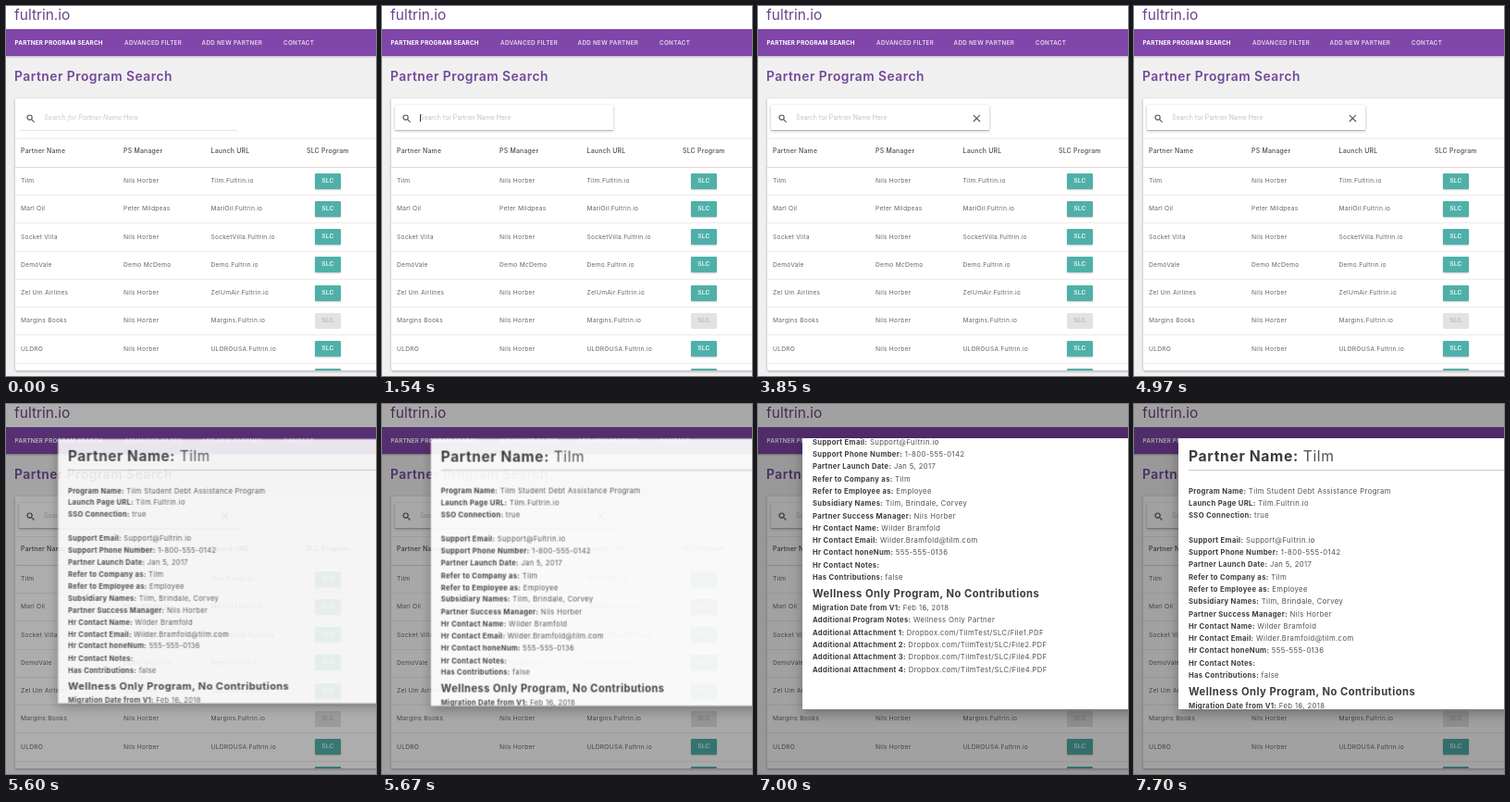
These frames come from a looping animation (400x400 px, 8000 ms). An HTML page:

```html
<!DOCTYPE html>
<html lang="en">
<head>
<meta charset="utf-8">
<title>Partner Program Search</title>
<style>
  html, body { margin: 0; width: 100%; height: 100%; overflow: hidden; }
  body { font: 6.7px/14px Inter, "Open Sans", sans-serif; letter-spacing: .035em; color: #666; }
  #stage { position: relative; width: 400px; height: 400px; overflow: hidden; background: #f0f0f0; }
  #stage div, #stage span.at, svg { position: absolute; white-space: nowrap; }

  .top { left: 0; top: 0; width: 400px; height: 25px; background: #fff; }
  .brand { left: 9px; top: 1px; font-size: 15.5px; line-height: 18px; letter-spacing: 0; color: #6a4387; }
  .nav { left: 0; top: 25px; width: 400px; height: 28.5px; background: #8046a9; color: #e6d9ee;
    font-size: 6.3px; font-weight: 600; letter-spacing: .05em; box-shadow: 0 1px 2px rgba(0,0,0,.25); }
  .nav .at { top: 7.5px; }
  .nav .on { color: #fff; font-weight: 700; letter-spacing: .03em; }
  h1 { position: absolute; margin: 0; left: 9px; top: 66px; font-size: 13.8px; line-height: 20px;
    font-weight: 600; letter-spacing: .036em; color: #74479a; white-space: nowrap; }

  .card { left: 9.5px; top: 99.5px; width: 420px; height: 294.5px; border-radius: 2px; background: #fff;
    box-shadow: 0 1px 3px rgba(0,0,0,.3); }
  .table { left: 0; top: 0; width: 400px; height: 394px; overflow: hidden; }
  .line { left: 10px; width: 390px; height: 1px; background: #ececec; }
  .head { color: #4d4d4d; font-size: 6.9px; font-weight: 500; }
  .row { left: 0; width: 400px; height: 30px; }
  .row .at { top: 8px; }
  .row .line { top: 30px; }
  .slc { left: 334px; top: 6.5px; width: 28px; height: 17px; line-height: 17px; border-radius: 1px;
    background: #4fb0aa; color: #e9f7f5; font-weight: 600; text-align: center;
    box-shadow: 0 1px 2px rgba(0,0,0,.2); }
  .slc.off { background: #e2e2e2; color: #b9b9b9; box-shadow: none; }

  .search { left: 14px; top: 107px; width: 236px; height: 28px; background: #fff;
    border-bottom: 1px solid #e6e6e6; box-sizing: border-box; }
  .lift { inset: 0; box-shadow: 0 1px 3px rgba(0,0,0,.32); }
  .search .at { top: 7px; left: 27px; }
  .hint { color: #c2c2c2; letter-spacing: 0; font-size: 6.9px; }
  .idle { font-style: italic; font-size: 7.1px; color: #c8c8c8; }
  .typed { font-size: 7px; letter-spacing: 0; color: #444; }
  .search .i { left: 29.8px; }
  .caret { left: 27px; top: 10px; width: .8px; height: 8px; background: #333; }
  .drop { left: 14px; top: 136.5px; width: 86.5px; height: 23.5px; background: #fff;
    box-shadow: 0 1px 2px rgba(0,0,0,.22); font-size: 6px; line-height: 23px; color: #444; text-indent: 6px; }

  .dim { inset: 0; background: rgba(0,0,0,.37); }
  .modal { left: 48px; top: 37px; width: 664px; height: 293px; overflow: hidden; background: #fff; color: #505050;
    transform-origin: 50% 50%; box-shadow: 0 5px 12px rgba(0,0,0,.3); }
  .body { left: 11px; top: 1px; width: 640px; height: 420px; font-size: 7.7px; letter-spacing: .05em; }
  .body b { color: #3c3c3c; font-weight: 700; letter-spacing: .04em; }
  .body .title { left: 0; top: 8.5px; font-size: 15.7px; line-height: 20px; letter-spacing: .035em; }
  .body .rule { left: 0; top: 32.5px; width: 640px; height: 1px; background: #c9c9c9; }
  .body .sub { left: 0; top: 265px; font-size: 11.25px; line-height: 16px; }

  /* one 8 s clock; 1% = 80 ms */
  .lift, .idle, .hint2, .t, .i, .caret, .drop, .clear, .rest, .dim, .modal, .body { animation: 8s step-end infinite; }
  .lift { animation-name: lift; animation-timing-function: ease-out; }
  .idle { animation-name: idle; }
  .hint2 { animation-name: hint; }
  .t { animation-name: t; }
  .i { animation-name: i; }
  .caret { animation-name: caret; }
  .drop { animation-name: t; }
  .clear { animation-name: clear; }
  .rest { animation-name: rest; }
  .dim { animation-name: dim; animation-timing-function: linear; }
  .modal { animation-name: modal; animation-timing-function: linear; }
  .body { animation-name: scroll; animation-timing-function: linear; }

  @keyframes lift { 0%, 17.5% { opacity: 0 } 20%, 100% { opacity: 1 } }
  @keyframes idle { 0% { opacity: 1 } 17.5%, 100% { opacity: 0 } }
  @keyframes hint { 0% { opacity: 0 } 17.5% { opacity: 1 } 26.25% { opacity: 0 } 47.25%, 100% { opacity: 1 } }
  @keyframes t { 0% { opacity: 0 } 26.25% { opacity: 1 } 47.25%, 100% { opacity: 0 } }
  @keyframes i { 0% { opacity: 0 } 28.875% { opacity: 1 } 47.25%, 100% { opacity: 0 } }
  @keyframes clear { 0% { opacity: 0 } 26.25%, 100% { opacity: 1 } }
  @keyframes rest { 0% { opacity: 1 } 26.25% { opacity: 0 } 47.25%, 100% { opacity: 1 } }
  @keyframes caret {
    0% { opacity: 0; left: 27px }
    17.5% { opacity: 1; left: 27px }
    23.625% { opacity: 0; left: 27px }
    26.25% { opacity: 1; left: 30px }
    28.875% { opacity: 1; left: 32.4px }
    36.75% { opacity: 0; left: 32.4px }
    40.25% { opacity: 1; left: 32.4px }
    43.75% { opacity: 0; left: 32.4px }
    45.5% { opacity: 1; left: 32.4px }
    47.25%, 100% { opacity: 0; left: 32.4px }
  }
  @keyframes dim {
    0% { opacity: 0 }
    65.625% { opacity: 0; animation-timing-function: cubic-bezier(.215,.61,.355,1) }
    74.375%, 100% { opacity: 1 }
  }
  @keyframes modal {
    0% { opacity: 0; transform: translateY(-23px) scale(.8) }
    65.625% { opacity: 0; transform: translateY(-23px) scale(.8); animation-timing-function: cubic-bezier(.215,.61,.355,1) }
    74.375%, 100% { opacity: 1; transform: none }
  }
  @keyframes scroll {
    0%, 78.75% { transform: translateY(0); animation-timing-function: ease-in-out }
    85.75%, 90.375% { transform: translateY(-105.6px); animation-timing-function: ease-in-out }
    95.375%, 100% { transform: translateY(0) }
  }
</style>
</head>
<body>
<div id="stage">
  <div class="top"></div>
  <div class="brand">fultrin.io</div>
  <div class="nav">
    <span class="at on" style="left:9.5px">PARTNER PROGRAM SEARCH</span>
    <span class="at" style="left:128px">ADVANCED FILTER</span>
    <span class="at" style="left:211.5px">ADD NEW PARTNER</span>
    <span class="at" style="left:300px">CONTACT</span>
  </div>
  <h1>Partner Program Search</h1>
  <div class="card"></div>
  <div class="table" id="table">
    <div class="line" style="top:143px"></div>
    <div class="head" style="left:16px;top:149.5px">Partner Name</div>
    <div class="head" style="left:127px;top:149.5px">PS Manager</div>
    <div class="head" style="left:221.5px;top:149.5px">Launch URL</div>
    <div class="head" style="left:325px;top:149.5px">SLC Program</div>
    <div class="line" style="top:173.5px;height:1.5px;background:#dadada"></div>
  </div>
  <div class="search">
    <div class="lift"></div>
    <svg style="left:8px;top:9.5px" width="10" height="10" fill="none" stroke="#555" stroke-width="1.2">
      <circle cx="3.6" cy="3.6" r="2.6"/><path d="M5.6 5.6 8.6 8.6"/>
    </svg>
    <span class="at hint idle">Search for Partner Name Here</span>
    <span class="at hint hint2">Search for Partner Name Here</span>
    <span class="at typed t">t</span>
    <span class="at typed i">i</span>
    <div class="caret"></div>
    <svg class="clear" style="left:218px;top:10px" width="9" height="9" stroke="#555" stroke-width="1.1">
      <path d="M.8.8 8 8M8 .8.8 8"/>
    </svg>
  </div>
  <div class="drop">tilm</div>
  <div class="dim"></div>
  <div class="modal">
    <div class="body" id="info">
      <div class="title"><b>Partner Name:</b> Tilm</div>
      <div class="rule"></div>
      <div class="sub"><b>Wellness Only Program, No Contributions</b></div>
    </div>
  </div>
</div>
<script>
  const boss = "Nils Horber";
  const partners = [
    ["Tilm", boss, "Tilm"],
    ["Marl Oil", "Peter Mildpeas", "MarlOil"],
    ["Socket Villa", boss, "SocketVilla"],
    ["DemoVale", "Demo McDemo", "Demo"],
    ["Zel Um Airlines", boss, "ZelUmAir"],
    ["Margins Books", boss, "Margins"],
    ["ULDRO", boss, "ULDROUSA"],
    ["", "", ""]
  ];
  const cell = (x, text) => `<span class="at" style="left:${x}px">${text}</span>`;
  const add = (id, html) => document.getElementById(id).insertAdjacentHTML("beforeend", html);

  partners.forEach(([name, manager, host], n) => add("table",
    `<div class="row${n ? " rest" : ""}" style="top:${174.1 + n * 30.25}px">` +
    cell(16, name) + cell(127, manager) + cell(221.5, host && host + ".Fultrin.io") +
    `<div class="slc${n === 5 ? " off" : ""}">SLC</div><div class="line"></div></div>`));

  const facts = [
    "Program Name: Tilm Student Debt Assistance Program",
    "Launch Page URL: Tilm.Fultrin.io",
    "SSO Connection: true",
    "",
    "Support Email: Support@Fultrin.io",
    "Support Phone Number: 1-800-555-0142",
    "Partner Launch Date: Jan 5, 2017",
    "Refer to Company as: Tilm",
    "Refer to Employee as: Employee",
    "Subsidiary Names: Tilm, Brindale, Corvey",
    "Partner Success Manager: " + boss,
    "Hr Contact Name: Wilder Bramfold",
    "Hr Contact Email: Wilder.Bramfold@tilm.com",
    "Hr Contact honeNum: 555-555-0136",
    "Hr Contact Notes: ",
    "Has Contributions: false"
  ];
  const notes = [
    "Migration Date from V1: Feb 16, 2018",
    "Additional Program Notes: Wellness Only Partner",
    ...[1, 2, 4, 4].map((f, n) => `Additional Attachment ${n + 1}: Dropbox.com/TilmTest/SLC/File${f}.PDF`)
  ];
  const list = (lines, top) => lines.forEach((line, n) => add("info",
    `<div style="left:0;top:${top + n * 13.3}px">${line.replace(/^[^:]+:/, "<b>$&</b>")}</div>`));
  list(facts, 49.5);
  list(notes, 282);
</script>
</body>
</html>
```
